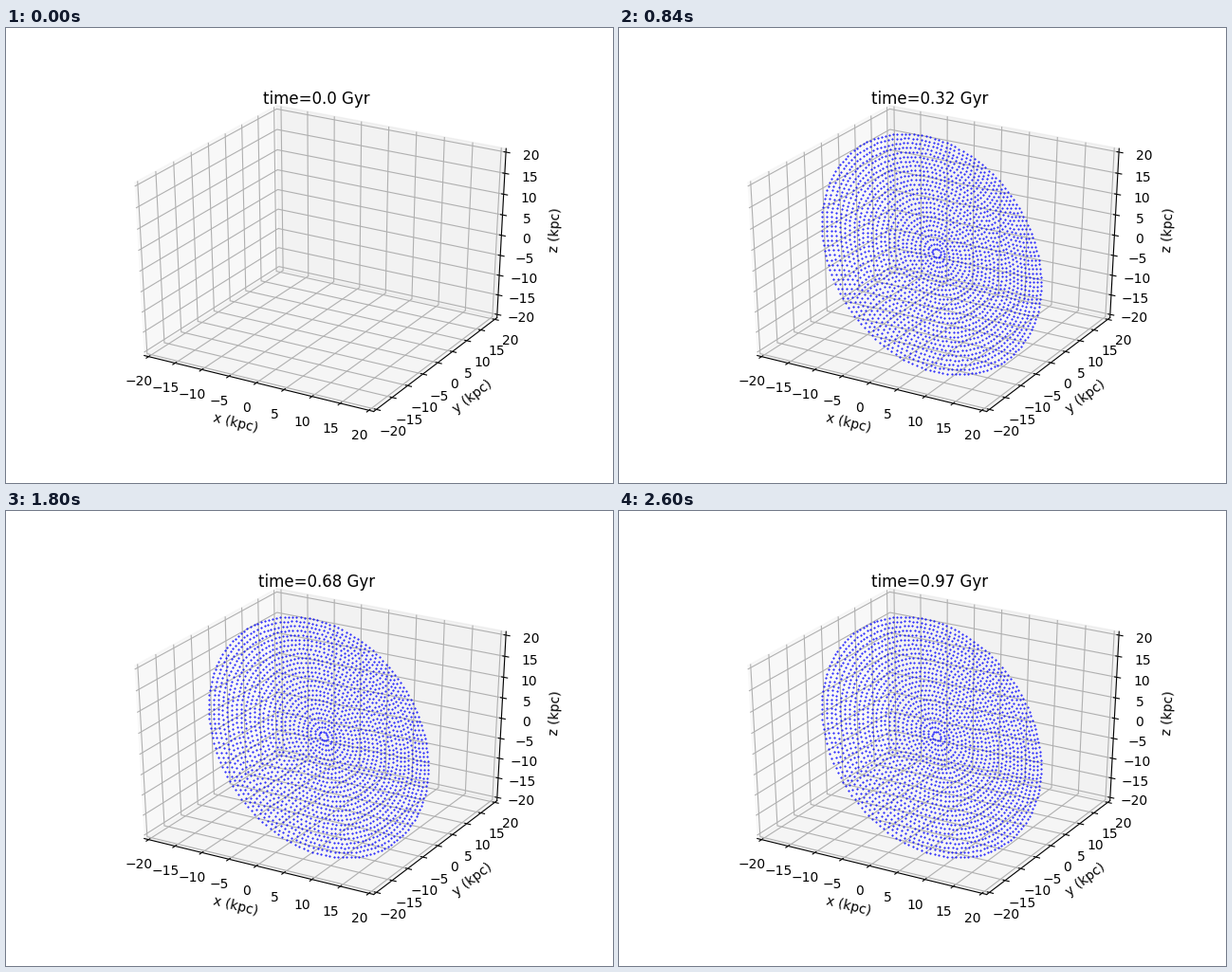
Recreate the animation shown at these times as a matplotlib script. Size 640x480 px, loop 2640 ms.

```python
import numpy as np
import matplotlib.pyplot as plt
from matplotlib.animation import FuncAnimation
from matplotlib.collections import LineCollection
from matplotlib.patches import Polygon

FRAMES, INTERVAL = 66, 40
SPAN = 40                     # kpc covered by each axis
DELTA = SPAN / 12
EDGE = SPAN / 2 + DELTA / 4   # half size of the drawn box
CAMERA = 10
TICKS = np.arange(-20, 21, 5)

plt.rcParams["font.family"] = "DejaVu Sans"
fig = plt.figure(figsize=(6.4, 4.8), dpi=100, facecolor="white")
ax = fig.add_axes([0.125, 0.11, 0.775, 0.77])
ax.set_xlim(-0.095, 0.09)
ax.set_ylim(-0.095, 0.09)
ax.axis("off")

# Camera basis for azimuth -60 and elevation 30 degrees
azim, elev = np.radians(-60), np.radians(30)
toward = np.array([np.cos(elev) * np.cos(azim),
                   np.cos(elev) * np.sin(azim), np.sin(elev)])
right = np.array([-np.sin(azim), np.cos(azim), 0])
up = np.cross(toward, right)


def project(points):
    """Perspective projection of points in kpc to the flat axes."""
    p = np.asarray(points, float) / SPAN
    depth = CAMERA - p @ toward
    return np.stack([p @ right / depth, p @ up / depth], axis=-1)


def replace(point, index, value):
    moved = np.array(point, float)
    moved[index] = value
    return moved


def push_out(point, index, distance):
    """Move a point away from the centre, except along one axis."""
    shift = np.where(np.asarray(point) < 0, -distance, distance)
    shift[index] = 0
    return point + shift


def line(points):
    x, y = project(points).T
    ax.plot(x, y, color="black", lw=0.8, zorder=1, clip_on=False)


CORNER = np.array([-EDGE, EDGE, -EDGE])   # where the three panes meet
POINT_SIZE = 48 / (72 * (6.4 * 0.775 + 4.8 * 0.77)) * DELTA


def draw_pane(corners, grey):
    shade = (grey, grey, grey)
    ax.add_patch(Polygon(project(np.array(corners) * EDGE), closed=False,
                         fc=shade, ec=shade, alpha=0.5, lw=1, zorder=0.5))


def draw_axis(index, name, side, tick_dir):
    """Axis line, label, grid and ticks; side is the coordinate to flip."""
    start = replace(CORNER, side, -CORNER[side])
    end = replace(start, index, -start[index])
    line([start, end])

    dx, dy = (project(end) - project(start)) * ax.bbox.size
    angle = np.degrees(np.arctan2(dy, dx)) % 180
    middle = push_out((start + end) / 2, index, 25 * POINT_SIZE)
    ax.text(*project(middle), f"{name} (kpc)", ha="center", va="center",
            rotation=angle - 180 if angle > 90 else angle)

    a, b = (index + 1) % 3, (index + 2) % 3
    grid = []
    for value in TICKS:
        bend = replace(CORNER, index, value)
        grid.append(project([replace(bend, a, -bend[a]), bend,
                             replace(bend, b, -bend[b])]))
    ax.add_collection(LineCollection(grid, colors="#b0b0b0", linewidths=0.8,
                                     zorder=1), autolim=False)

    sign = np.sign(CORNER[tick_dir])
    for value in TICKS:
        pos = replace(start, index, value)
        base = pos[tick_dir]
        line([replace(pos, tick_dir, base + 0.1 * sign * DELTA),
              replace(pos, tick_dir, base - 0.2 * sign * DELTA)])
        ax.text(*project(push_out(pos, index, 11.5 * POINT_SIZE)),
                str(value).replace("-", "\u2212"), ha="center", va="top")


draw_pane([(-1, -1, -1), (-1, 1, -1), (-1, 1, 1), (-1, -1, 1)], 0.95)
draw_pane([(-1, 1, -1), (1, 1, -1), (1, 1, 1), (-1, 1, 1)], 0.90)
draw_pane([(-1, -1, -1), (1, -1, -1), (1, 1, -1), (-1, 1, -1)], 0.925)
draw_axis(0, "x", side=1, tick_dir=1)
draw_axis(1, "y", side=0, tick_dir=0)
draw_axis(2, "z", side=0, tick_dir=0)

# Stars on rings 1 kpc apart, orbiting a central mass in a tilted disk.
# The first ring holds 12 stars and each further ring 6 more.
rings = [(k, 6 * (k + 1)) for k in range(1, 27)]
radius = np.concatenate([np.full(n, float(k)) for k, n in rings])
phase = np.concatenate([np.arange(n) * 2 * np.pi / n for _, n in rings])
omega = np.sqrt(4.499e5 / radius ** 3)    # radians per Gyr
tilt = np.radians(60)
disk_x = np.array([np.cos(tilt), 0, -np.sin(tilt)])
disk_y = np.array([0, 1, 0])

stars, = ax.plot([], [], "b.", ms=1, zorder=3, clip_on=False)
title = ax.set_title("", x=0.4995, y=0.92, pad=5.3)


def update(i):
    time = i * 15 / 1000
    title.set_text(f"time={round(time, 2)} Gyr")
    if i == 0:
        stars.set_data([], [])
    else:
        angle = phase + omega * time
        points = (np.outer(radius * np.cos(angle), disk_x)
                  + np.outer(radius * np.sin(angle), disk_y))
        stars.set_data(*project(points).T)
    return stars, title


anim = FuncAnimation(fig, update, frames=FRAMES, interval=INTERVAL,
                     repeat=True, repeat_delay=0, blit=False)
plt.show()
```
